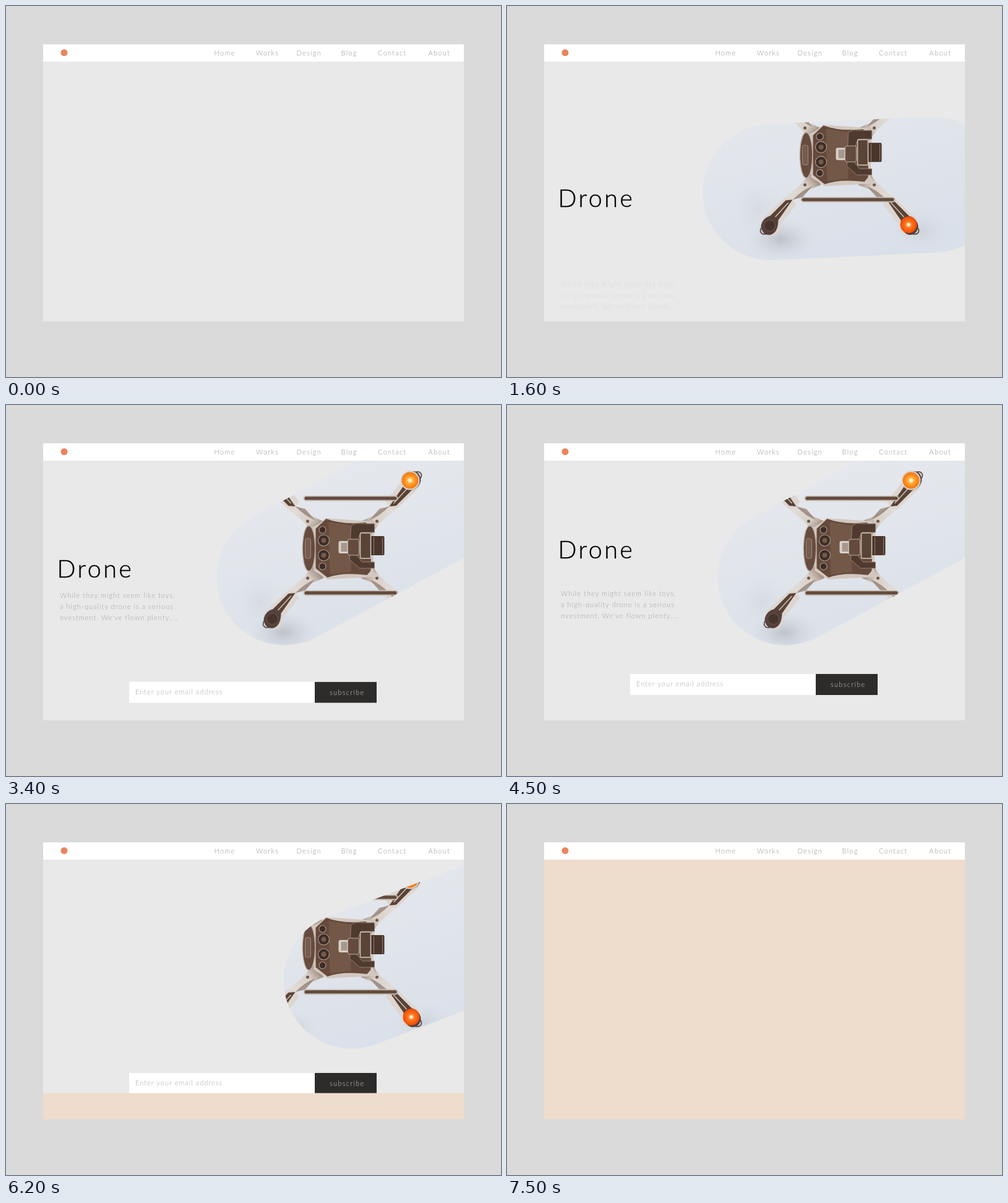
An HTML page for the animation above (8 s loop, 800 by 600 pixels).

```html
<!DOCTYPE html>
<html lang="en">
<head>
<meta charset="utf-8">
<title>Drone landing page</title>
<style>
  html, body { margin: 0; width: 100%; height: 100%; overflow: hidden; background: #dadada; }
  svg { display: block; width: 800px; height: 600px; }
  text { font: 300 11px Lato, "Open Sans", sans-serif; letter-spacing: 1.05px; }
  .nav { fill: #949494; }
  .nav text, .button { letter-spacing: 1.3px; }
  .copy { fill: #a2a2a2; }
  .title { font-size: 39.5px; letter-spacing: 3.4px; fill: #000; stroke: #000; stroke-width: .4px; }

  /* this curve is exactly smoothstep */
  .move { animation: 8s cubic-bezier(.3333, 0, .6667, 1) infinite both; }
  #title { animation-name: title-move, title-fade; }
  #copy { animation-name: copy-move, copy-fade; }
  #form { animation-name: form-move, form-fade; }
  #pill { animation-name: pill-move, pill-turn; }
  #photo { animation-name: photo-move; }
  #sheet { animation-name: sheet-move; }
  #title, #copy, #form { animation-timing-function: cubic-bezier(.3333, 0, .6667, 1), linear; }

  @keyframes title-move {
    0%, 4.375% { translate: 0 236px; }
    26.125%, 51.25% { translate: 0 0; }
    68.75%, 100% { translate: 0 -155px; }
  }
  @keyframes title-fade {
    0%, 4.375% { opacity: 0; }
    12.5%, 56.25% { opacity: 1; }
    68%, 100% { opacity: 0; }
  }
  @keyframes copy-move {
    0%, 16.25% { translate: 0 149px; }
    45%, 58.75% { translate: 0 -3.5px; }
    78.125%, 100% { translate: 0 -208px; }
  }
  @keyframes copy-fade {
    0%, 16.25% { opacity: 0; }
    35%, 65% { opacity: 1; }
    77.5%, 100% { opacity: 0; }
  }
  @keyframes form-move {
    0%, 25% { translate: 0 58.6px; }
    50%, 100% { translate: 0 0; }
  }
  @keyframes form-fade {
    0%, 25% { opacity: 0; }
    33.4%, 100% { opacity: 1; }
  }
  @keyframes pill-move {
    0%, 4.375% { translate: 990px 302px; }
    15.875% { translate: 557px 302px; }
    39.4% { translate: 566px 216px; }
    68.5% { translate: 566px 216px; animation-timing-function: cubic-bezier(.6, 0, .8, .4); }
    82.5%, 100% { translate: 1000px 302px; }
  }
  @keyframes pill-turn {
    0%, 14.875% { rotate: 0deg; }
    42% { rotate: -28.3deg; }
    68.5% { rotate: -28.3deg; animation-timing-function: cubic-bezier(.6, 0, .8, .4); }
    82.5%, 100% { rotate: 0deg; }
  }
  @keyframes photo-move {
    0%, 15.875% { translate: -6.5px 10px; }
    39.4%, 100% { translate: 0 0; }
  }
  @keyframes sheet-move {
    0%, 73.56% { translate: 0 420px; }
    93.56%, 100% { translate: 0 0; }
  }
</style>
</head>
<body>
<svg viewBox="0 0 800 600">
  <clipPath id="panel-clip"><rect x="60" y="90" width="680" height="420"/></clipPath>
  <clipPath id="pill-clip">
    <rect id="pill" class="move" x="-241.5" y="-110" width="483" height="220" rx="110"/>
  </clipPath>
  <defs>
    <linearGradient id="sky" x1="0" y1="0" x2=".35" y2="1">
      <stop offset="0" stop-color="#e7e9ee"/>
      <stop offset=".5" stop-color="#e2e6ec"/>
      <stop offset="1" stop-color="#dae0e9"/>
    </linearGradient>
    <linearGradient id="shell" gradientUnits="userSpaceOnUse" x1="34" y1="30" x2="92" y2="76">
      <stop offset="0" stop-color="#8d7567"/>
      <stop offset=".35" stop-color="#d9d0c9"/>
      <stop offset="1" stop-color="#e6e2df"/>
    </linearGradient>
    <radialGradient id="shade">
      <stop offset="0" stop-color="#9a9aa0" stop-opacity=".45"/>
      <stop offset="1" stop-color="#c4c8d0" stop-opacity="0"/>
    </radialGradient>
    <radialGradient id="lamp">
      <stop offset=".12" stop-color="#fff6d8"/>
      <stop offset=".35" stop-color="#ffb040"/>
      <stop offset=".75" stop-color="#ff8616"/>
      <stop offset="1" stop-color="#f07a1c"/>
    </radialGradient>
    <radialGradient id="lamp-red">
      <stop offset=".12" stop-color="#fff0c8"/>
      <stop offset=".35" stop-color="#ff7a20"/>
      <stop offset="1" stop-color="#f04a04"/>
    </radialGradient>
    <!-- lower right arm, measured from the hub -->
    <g id="arm">
      <path d="M30 46L48 20Q52 42 92 68L82 78Q58 56 30 46Z" fill="url(#shell)"/>
      <path d="M44 48Q60 54 76 70L60 66Z" fill="#7d6557" opacity=".6"/>
      <path d="M78 66L90 68L122 98Q130 108 124 120Q116 130 106 128Q97 124 97 112L70 78Z" fill="#ddd6d0"/>
      <path d="M76 70L87 71L112 96L101 106Z" fill="#5a4236"/>
      <path d="M83 75L104 98" stroke="#cfc4bb" stroke-width="1.5"/>
      <path d="M120 112q8 2 8 9q-2 7 -11 4" fill="none" stroke="#6a5b54" stroke-width="2"/>
      <path d="M99 104L108 95Q124 98 127 112Q126 127 113 127Q100 125 99 104Z" fill="#55403a"/>
      <circle cx="113" cy="112" r="9" fill="#46352e" stroke="#6d574c"/>
      <circle cx="56" cy="46" r="2.5" fill="#6d574b"/>
    </g>
    <g id="bar">
      <rect x="-63" y="-4.5" width="153" height="9" rx="4.5" fill="#cabfb6"/>
      <rect x="-61" y="-2.8" width="149" height="5.4" rx="2.7" fill="#624a3d"/>
    </g>
  </defs>

  <rect width="800" height="600" fill="#dadada"/>
  <rect x="60" y="90" width="680" height="420" fill="#e9e9e9"/>

  <g clip-path="url(#panel-clip)">
    <g clip-path="url(#pill-clip)">
      <rect x="300" y="60" width="460" height="370" fill="url(#sky)"/>
      <g id="photo" class="move">
        <ellipse cx="448" cy="368" rx="54" ry="34" fill="url(#shade)"/>
        <ellipse cx="412" cy="318" rx="42" ry="48" fill="url(#shade)" opacity=".25"/>
        <ellipse cx="676" cy="354" rx="46" ry="32" fill="url(#shade)" opacity=".4"/>
        <g transform="translate(543.5 234)">
          <use href="#arm"/>
          <use href="#arm" transform="scale(-1 1)"/>
          <use href="#arm" transform="scale(1 -1)"/>
          <use href="#arm" transform="scale(-1)"/>
          <circle cx="109.5" cy="-112" r="15.5" fill="#ddd6d0"/>
          <circle cx="109.5" cy="-112" r="13.5" fill="url(#lamp)"/>
          <circle cx="111.5" cy="110.5" r="13.5" fill="url(#lamp-red)"/>
          <use href="#bar" transform="translate(0 -83)"/>
          <use href="#bar" transform="translate(0 70)"/>

          <path d="M-50 -36Q-38 -40 -27 -51L46 -46L52 -32L50 34L56 44L-24 48L-46 34Z" fill="#d3c8c0"/>
          <ellipse cx="-54" cy="-2" rx="11" ry="38" fill="#bfb1a7"/>
          <ellipse cx="-54" cy="-2" rx="9.5" ry="36" fill="#664c3f"/>
          <rect x="-60" y="-18" width="9" height="32" rx="3" fill="#765c4d" stroke="#a08a7c"/>
          <path d="M-26 -50Q0 -40 38 -44L47 -34L46 34L40 41Q0 36 -24 45L-43 30V-34Z" fill="#654a3c"/>
          <path d="M-22 -45L14 -39V36L-20 40Z" fill="#735847"/>
          <g fill="#3d2d26" stroke="#a8958a" stroke-width="1.2">
            <circle cx="-32" cy="-32" r="5.5"/>
            <circle cx="-30" cy="-15" r="9"/>
            <circle cx="-30" cy="9" r="9"/>
            <circle cx="-32" cy="27" r="5.5"/>
          </g>
          <g fill="#765a4a">
            <circle cx="-30" cy="-15" r="4"/>
            <circle cx="-30" cy="9" r="4"/>
          </g>

          <path d="M14 -38Q20 -44 30 -42H52V-28H30L24 -14V10L32 20H52V30H28L12 16Z" fill="#4f3a30" stroke="#937d70"/>
          <rect x="-6" y="-14" width="17" height="20" rx="3" fill="#d8d0c9"/>
          <rect x="-2" y="-11" width="10" height="14" fill="#a8988c"/>
          <rect x="9" y="-17" width="18" height="26" rx="3" fill="#644b3e" stroke="#bcaea4"/>
          <rect x="45" y="-22" width="23" height="31" rx="2" fill="#4a362d"/>
          <path d="M51 -20V8M65 -20V8" stroke="#927d70"/>
          <rect x="29" y="-27" width="17" height="41" rx="2" fill="#5a4337" stroke="#d2c7be" stroke-width="1.5"/>
        </g>
      </g>
    </g>

    <text id="title" class="move title" x="82.5" y="279">Drone</text>
    <g id="copy" class="move copy">
      <text x="87" y="312">While they might seem like toys,</text>
      <text x="87" y="330">a high-quality drone is a serious</text>
      <text x="87" y="348">nvestment. We've flown plenty....</text>
    </g>
  </g>

  <g id="form" class="move">
    <rect x="199" y="435" width="300" height="34" fill="#fff"/>
    <rect x="499" y="435" width="100" height="34" fill="#2d2c2b"/>
    <text x="209" y="455" fill="#a8a8a8">Enter your email address</text>
    <text class="button" x="523" y="456" fill="#d0d0d0">subscribe</text>
  </g>

  <g clip-path="url(#panel-clip)">
    <rect id="sheet" class="move" x="60" y="90" width="680" height="420" fill="#eedccd"/>
  </g>

  <rect x="60" y="62" width="680" height="28" fill="#fff"/>
  <circle cx="94" cy="75.5" r="5.5" fill="#e8855c"/>
  <g class="nav">
    <text x="336.5" y="80">Home</text>
    <text x="404" y="80">Works</text>
    <text x="469.5" y="80">Design</text>
    <text x="541.5" y="80">Blog</text>
    <text x="601" y="80">Contact</text>
    <text x="682.5" y="80">About</text>
  </g>
</svg>
<script>
  // Move the keyframes in whole 100 ms steps.
  const LOOP = 8000, STEP = 100;
  const moves = document.getAnimations();
  moves.forEach(m => m.pause());
  const start = performance.now();

  function draw() {
    const time = (performance.now() - start) % LOOP;
    const held = Math.floor(time / STEP) * STEP;
    moves.forEach(m => { m.currentTime = held; });
    requestAnimationFrame(draw);
  }
  draw();
</script>
</body>
</html>
```
